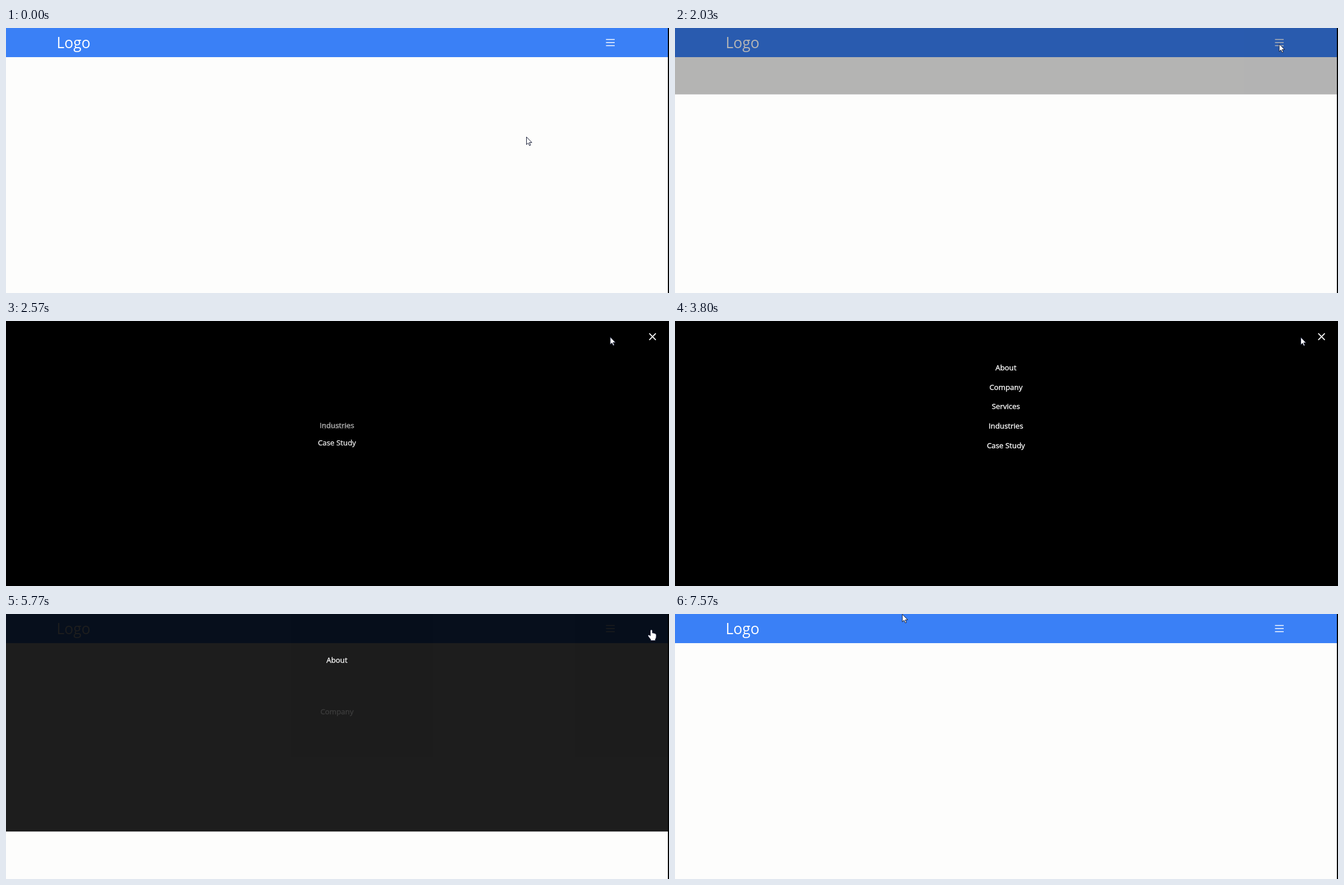
Animation of 1184 by 473 pixels, one loop 7.67 s. Source, as an HTML page:

```html
<!DOCTYPE html>
<html lang="en">
<head>
<meta charset="utf-8">
<title>Overlay menu</title>
<style>
html, body { margin: 0; width: 100%; height: 100%; overflow: hidden; background: #fdfdfc; }
svg { display: block; width: 1184px; height: 473px; }
text { font-family: "Open Sans", "Noto Sans", sans-serif; fill: #fff; }
.item { font-size: 13.3px; text-anchor: middle; stroke: #fff; stroke-width: .35px; }
</style>
</head>
<body>
<svg viewBox="0 0 1184 473">
  <defs>
    <clipPath id="clip"><rect id="clipBox" width="1182" height="0"/></clipPath>
  </defs>
  <rect width="1184" height="473" fill="#fdfdfc"/>
  <rect width="1182" height="52" fill="#3a80f6"/>
  <text x="90.4" y="36.3" font-size="26.5">Logo</text>
  <path d="M1071.5 20.5h15.5M1071.5 26h15.5M1071.5 31.5h15.5" stroke="#fff" stroke-width="1.5"/>
  <g id="overlay" clip-path="url(#clip)">
    <rect width="1182" height="473"/>
    <g id="items"></g>
    <path id="close" d="M1148.8 22.2l11.6 11.6m0-11.6l-11.6 11.6" stroke="#fff" stroke-width="1.9"/>
  </g>
  <rect x="1182" width="2" height="473"/>
  <g id="cursor" stroke="#141a33" fill="#fff" stroke-width="1" stroke-linejoin="round">
    <path id="arrow" d="M.5.5v13.6l3.1-2.9 2.2 4.7 2.1-.9-2.2-4.6h4.4z"/>
    <path id="hand" d="M-2.8 2Q-2.800 0-1 0Q.8 0 .8 2V6Q2.600 5 3.600 6.500Q5.300 5.700 6 7.300Q7.700 7 7.700 9.200V13Q7.700 15.400 6.200 17V19.500H-2.300V17.500L-6.600 12Q-7.600 10-5.900 9.200Q-4.500 9-2.800 11Z"/>
  </g>
</svg>
<script>
const LOOP = 7670, FULL = 490, SHORT = 439;
const el = id => document.getElementById(id);
const clamp = v => Math.min(1, Math.max(0, v));
const span = (t, start, length) => clamp((t - start) / length);

function bezier(x1, y1, x2, y2) {
  const at = (a, b, s) => 3 * a * s * (1 - s) ** 2 + 3 * b * s * s * (1 - s) + s ** 3;
  return x => {
    if (x <= 0 || x >= 1) return clamp(x);
    let lo = 0, hi = 1;
    for (let i = 0; i < 24; i++) {
      const mid = (lo + hi) / 2;
      if (at(x1, x2, mid) < x) lo = mid; else hi = mid;
    }
    return at(y1, y2, lo);
  };
}
const ease = bezier(0.25, 0.1, 0.25, 1);
const easeOut = bezier(0, 0, 0.58, 1);
const easeInOut = bezier(0.42, 0, 0.58, 1);

// Remaining distance (1 to 0) of an underdamped spring, time in ms.
function spring(ms) {
  if (ms <= 0) return 1;
  const s = ms / 1000, damp = 12.5, freq = 18.5;
  return Math.exp(-damp * s) * (Math.cos(freq * s) + damp / freq * Math.sin(freq * s));
}

const items = ["About", "Company", "Services", "Industries", "Case Study"].map((label, i) => {
  const node = document.createElementNS("http://www.w3.org/2000/svg", "text");
  node.textContent = label;
  node.setAttribute("class", "item");
  node.setAttribute("x", 591);
  el("items").append(node);
  const rank = 4 - i;
  return { node, y: 88 + 34.7 * i, enter: 2370 + 80 * rank, leave: i ? 5090 + 170 * rank : Infinity };
});

// Pointer path: time, x, y
const path = [
  [500, 929, 194], [870, 1087, 30], [1040, 1087, 30], [1230, 1078.5, 28],
  [2950, 1078.5, 28], [3450, 1085, 29], [4200, 1153.5, 28],
  [6380, 1153.5, 28], [7130, 832, 56], [7280, 720, 58], [7570, 405.5, 0]
];

function pointer(t) {
  const next = path.findIndex(p => p[0] > t);
  if (next === 0) return path[0].slice(1);
  if (next < 0) return path[path.length - 1].slice(1);
  const a = path[next - 1], b = path[next];
  const raw = span(t, a[0], b[0] - a[0]);
  const k = t < 1000 ? easeInOut(raw) : raw;
  return [a[1] + (b[1] - a[1]) * k, a[2] + (b[2] - a[2]) * k];
}

function draw(t) {
  const closing = easeInOut(span(t, 5700, 300));
  const height = t < 4800 ? FULL * easeOut(span(t, 1920, 720)) : SHORT * (1 - closing);
  el("clipBox").setAttribute("height", height);
  el("overlay").setAttribute("opacity", span(t, 1888, 490) * (1 - closing));
  el("close").setAttribute("opacity", span(t, 2080, 150) * (1 - span(t, 5600, 160)));

  items.forEach(({ node, y, enter, leave }, i) => {
    const out = t >= leave;
    let shift = 50 * (out ? 1 - spring(t - leave) : spring(t - enter));
    let alpha = out ? 1 - ease(span(t, leave, 300)) : ease(span(t, enter, 300));
    if (i === 0) {
      shift -= 5 * closing;
      alpha *= 1 - 0.2 * closing;
    }
    node.setAttribute("y", y + shift);
    node.setAttribute("opacity", alpha);
  });

  const [x, y] = pointer(t);
  const hand = (t >= 1070 && t < 1930) || (t >= 4300 && t < 6400);
  el("cursor").setAttribute("transform", `translate(${x} ${y})`);
  el("arrow").setAttribute("display", hand ? "none" : "inline");
  el("hand").setAttribute("display", hand ? "inline" : "none");
}

const begin = performance.now();
function tick() {
  draw((performance.now() - begin) % LOOP);
  requestAnimationFrame(tick);
}
tick();
</script>
</body>
</html>
```
